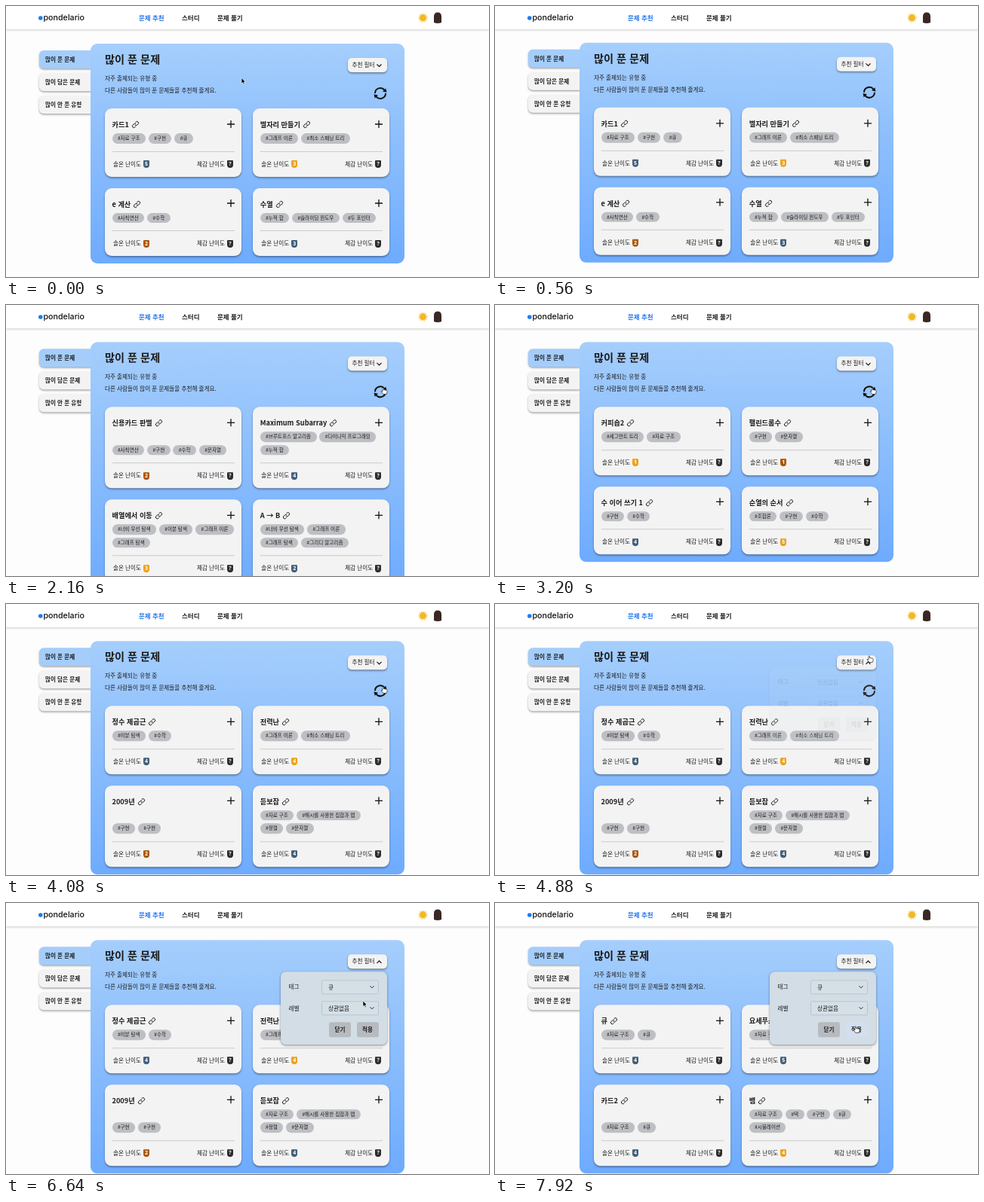
Animation of 640 by 360 pixels, one loop 8 s. Source, as an HTML page:

```html
<!DOCTYPE html>
<html lang="ko">
<head>
<meta charset="utf-8">
<style>
html, body { margin: 0; width: 100%; height: 100%; overflow: hidden; background: #fdfdfd; }
body { position: relative; font: 400 7.6px "Noto Sans CJK KR", "Noto Sans CJK", sans-serif; color: #1c1c1c; }
body *, body { box-sizing: border-box; }
svg { fill: none; stroke: #111; overflow: visible; }
.abs, .t, .tab, .popup div, .popup svg, .card > svg { position: absolute; }
/* top gives the vertical centre of the line */
.t { line-height: 20px; margin-top: -10px; white-space: nowrap; }
header { position: absolute; z-index: 2; width: 640px; height: 31px; background: #fff; box-shadow: 0 1px 3px rgba(0,0,0,.2); font-size: 8.5px; font-weight: 700; }
header svg { stroke: none; }
.brand { font: 500 10.7px/20px Inter, sans-serif; color: #111; }
#page { position: absolute; width: 640px; height: 360px; }
.tab { left: 44px; width: 80px; height: 23.5px; padding-left: 8px; border-radius: 6px 0 0 6px; background: #f3f3f3; box-shadow: 0 1.5px 2.5px rgba(0,0,0,.35); font-weight: 700; line-height: 23px; }
.panel { position: absolute; left: 112px; top: 50px; width: 415.5px; padding: 86.3px 0 10px 19px; border-radius: 9px; background: linear-gradient(#a5cefc, #6eabfe); }
#cards { display: grid; grid-template-columns: 181px 181px; gap: 15.2px; }
.card { position: relative; display: flex; flex-direction: column; padding-top: 33px; border-radius: 9px; background: #f3f3f3; box-shadow: 0 1.5px 2.5px rgba(0,0,0,.4); }
.name { left: 9.5px; top: 20.7px; font-size: 9.2px; font-weight: 700; }
.name svg { margin-left: 4px; vertical-align: -1.5px; }
.tags { flex: 1; display: flex; flex-wrap: wrap; align-content: flex-end; gap: 3.8px; width: 163px; margin-left: 9.5px; }
.tags span { height: 13.5px; padding: 0 7.4px; border-radius: 7px; background: #bdbfc3; font-size: 6.6px; line-height: 13px; white-space: nowrap; }
.foot { position: relative; flex: none; height: 44px; }
.foot hr { position: absolute; left: 9.5px; top: 10px; width: 162px; height: 1px; margin: 0; border: 0; background: #cbcbcb; }
.badge { position: absolute; top: 22.5px; width: 8px; height: 10px; border-radius: 1px 1px 4px 4px; color: #fff; font: 700 7px/9px "Noto Sans", sans-serif; text-align: center; }
.filter { left: 452.5px; top: 68.5px; width: 52.5px; height: 19.5px; border-radius: 5px; background: #f3f3f3; box-shadow: 0 1.5px 2.5px rgba(0,0,0,.4); }
.popup { position: absolute; left: 363.5px; top: 92.3px; width: 141.5px; height: 97px; border-radius: 7px; background: #d2dde5; box-shadow: 0 1px 3px rgba(0,0,0,.45); }
.popup .select { left: 54.5px; width: 76px; height: 19.5px; padding-left: 8px; border: .7px solid #bcc5cd; border-radius: 2px; background: #d5dfe6; line-height: 18px; }
.popup .button { top: 67px; width: 29px; height: 20px; border-radius: 3px; background: #b7bbc0; font-weight: 700; line-height: 19px; text-align: center; }
#list { left: 414.5px; top: 106.7px; width: 75.5px; height: 251px; border-radius: 4px; background: rgba(226,230,230,.96); box-shadow: 0 1px 4px rgba(0,0,0,.45); font-size: 7px; font-weight: 500; }
#items { position: absolute; left: 2px; top: 1px; width: 72px; height: 240px; overflow: hidden; }
#items div { height: 12.26px; padding-left: 9.5px; border-radius: 3px; line-height: 12px; white-space: nowrap; }
#items .on { background: #b117b2; color: #fff; }
.check { left: 4px; top: 4.5px; }
#cursor { left: 0; top: 0; z-index: 3; }
</style>
</head>
<body>
<header>
  <svg class="abs" width="640" height="32">
    <circle cx="45.8" cy="16" r="2.8" fill="#1c7cf0"/>
    <circle cx="552.5" cy="15.7" r="4.6" fill="#f3b824"/>
    <circle cx="552.5" cy="15.7" r="5.6" style="stroke:#f5cf70" stroke-width="1.4" stroke-dasharray="1.4 1.53"/>
    <path d="M567 22V14Q567 8.500 572 8.500T577 14V22Q572 24 567 22Z" fill="#3b2723"/>
  </svg>
  <span class="t brand" style="left:49.500px;top:15.500px">pondelario</span>
  <span class="t" style="left:176px;top:14.500px;color:#2375e9">문제 추천</span>
  <span class="t" style="left:233px;top:14.500px">스터디</span>
  <span class="t" style="left:280px;top:14.500px">문제 풀기</span>
</header>

<div id="page">
  <div class="tab" style="top:59px;background:#a4cdfb">많이 푼 문제</div>
  <div class="tab" style="top:89px">많이 담은 문제</div>
  <div class="tab" style="top:119px">많이 안 푼 유형</div>
  <div class="panel"><div id="cards"></div></div>
  <span class="t" style="left:131px;top:70px;font-size:14.2px;font-weight:700">많이 푼 문제</span>
  <span class="t" style="left:131px;top:95.500px">자주 출제되는 유형 중</span>
  <span class="t" style="left:131px;top:111.500px">다른 사람들이 많이 푼 문제들을 추천해 줄게요.</span>
  <div class="abs filter">
    <span class="t" style="left:6px;top:9.700px">추천 필터</span>
    <svg class="abs" style="left:38px;top:7px" width="7" height="6"><path id="arrow" stroke-width="1.2"/></svg>
  </div>
  <svg class="abs" style="left:495.500px;top:115.500px" width="1" height="1">
    <g id="half"><path d="M-7 0A7 7 0 0 1 5.500 -4.300" stroke-width="2"/><path d="M3 -2.500L8.500 -1.200L7.300 -6.500Z" fill="#111" stroke="none"/></g>
    <use href="#half" transform="rotate(180)"/>
  </svg>
  <div class="popup" id="popup">
    <span class="t" style="left:11px;top:20px">태그</span>
    <span class="t" style="left:11px;top:48.500px">레벨</span>
    <div class="select" id="tagSelect" style="top:10.500px"></div>
    <div class="select" style="top:38.500px">상관없음</div>
    <svg style="left:118px;top:18px" width="6" height="34"><path d="M.5 1L3 3.500L5.500 1M.5 29L3 31.500L5.500 29" stroke-width=".9"/></svg>
    <div class="button" style="left:64.500px">닫기</div>
    <div class="button" id="apply" style="left:101px">적용</div>
  </div>
  <div class="abs" id="list">
    <div id="items"></div>
    <svg class="abs check" width="6" height="6"><path id="check" d="M.5 3L2 5L5 0"/></svg>
    <svg class="abs" style="left:34.500px;top:244px" width="6" height="4"><path d="M.5 .5L3 3L5.500 .5" stroke-width="1"/></svg>
  </div>
</div>

<svg class="abs" id="cursor" width="10" height="12">
  <path id="pointer" d="M0 0V7.500L1.700 6L2.900 8.600L4.200 8L3 5.500H5.300Z" fill="#000" stroke="#fff" stroke-width=".6"/>
  <path id="hand" d="M-1 4V.5Q-.3 -.6 .5 .5V2.500L4.500 3.300Q5.500 3.800 5 6L4.200 8.500H0L-3 5Q-3 3.700 -1 5Z" fill="#fff" stroke="#222" stroke-width=".7"/>
</svg>

<script>
const LOOP = 8000;
const $ = id => document.getElementById(id);
const TIERS = { s: '#435f7a', g: '#eda21a', b: '#ad5608' };

// title | tier and level | tags
const SETS = [
  { from: 0, cards: ['카드1|s5|자료 구조,구현,큐', '별자리 만들기|g3|그래프 이론,최소 스패닝 트리',
    'e 계산|b2|사칙연산,수학', '수열|s3|누적 합,슬라이딩 윈도우,두 포인터'] },
  { from: 1520, cards: ['신용카드 판별|b2|사칙연산,구현,수학,문자열', 'Maximum Subarray|s4|브루트포스 알고리즘,다이나믹 프로그래밍,누적 합',
    '배열에서 이동|g3|너비 우선 탐색,이분 탐색,그래프 이론,그래프 탐색', 'A → B|s2|너비 우선 탐색,그래프 이론,그래프 탐색,그리디 알고리즘'] },
  { from: 2880, cards: ['커피숍2|g1|세그먼트 트리,자료 구조', '팰린드롬수|b1|구현,문자열',
    '수 이어 쓰기 1|s4|구현,수학', '순열의 순서|g5|조합론,구현,수학'] },
  { from: 3760, cards: ['정수 제곱근|s4|이분 탐색,수학', '전력난|g4|그래프 이론,최소 스패닝 트리',
    '2009년|b2|구현,구현', '듣보잡|s4|자료 구조,해시를 사용한 집합과 맵,정렬,문자열'] },
  { from: 7360, cards: ['큐|s4|자료 구조,큐', '요세푸스 문제 0|s5|자료 구조,구현,큐',
    '카드2|s4|자료 구조,큐', '뱀|g4|자료 구조,덱,구현,큐,시뮬레이션'] }
];
const OPTIONS = '상관없음,큐,DP,BFS,DFS,스택,정렬,그리디,자료 구조,이분 탐색,시뮬레이션,브루트포스,분할 정복,문자열,구현,백트래킹,두 포인터,트리,해싱,슬라이딩 윈도우'.split(',');

// time, x, y of the cursor tip
const PATH = [[0, 312, 95.5], [80, 312, 95.5], [480, 420, 104], [880, 500, 110], [4480, 500, 110], [4760, 496, 69],
  [4960, 496, 69], [5300, 473.5, 113], [5900, 473.5, 113], [6240, 472, 123], [6500, 472, 123], [7040, 478, 164], [LOOP, 478, 164]];

const badge = (x, color, label) => `<span class="badge" style="left:${x}px;background:${color}">${label}</span>`;
const cardHtml = text => {
  const [name, level, tags] = text.split('|');
  return `<div class="card">
    <span class="t name">${name}<svg width="9" height="9"><path d="M3.800 5.200A2 2 0 0 0 6.500 5.300L8 3.800A1.900 1.900 0 0 0 5.200 1L4.400 1.800M5.200 3.800A2 2 0 0 0 2.500 3.700L1 5.200A1.900 1.900 0 0 0 3.800 8L4.600 7.200"/></svg></span>
    <svg style="left:162px;top:15.500px" width="10" height="10"><path d="M0 5H10M5 0V10" stroke-width="1.3"/></svg>
    <div class="tags">${tags.split(',').map(tag => `<span>#${tag}</span>`).join('')}</div>
    <div class="foot"><hr><span class="t" style="left:11px;top:27px">솔온 난이도</span>${badge(51, TIERS[level[0]], level[1])}
    <span class="t" style="left:122px;top:27px">체감 난이도</span>${badge(162, '#2d2d2d', '?')}</div></div>`;
};

$('items').innerHTML = OPTIONS.map(option => `<div>${option}</div>`).join('');

const ramp = (t, from, to) => Math.min(1, Math.max(0, (t - from) / (to - from)));
const ease = p => p * p * (3 - 2 * p);
const show = (id, visible) => $(id).style.display = visible ? '' : 'none';

function cursorAt(t) {
  const i = PATH.findIndex(point => point[0] > t);
  const [t0, x0, y0] = PATH[i - 1], [t1, x1, y1] = PATH[i];
  const p = ease(ramp(t, t0, t1));
  return [x0 + (x1 - x0) * p, y0 + (y1 - y0) * p];
}

let shownSet;
function draw(t) {
  const set = SETS.findLast(s => s.from <= t);
  if (set !== shownSet) {
    $('cards').innerHTML = set.cards.map(cardHtml).join('');
    shownSet = set;
  }
  const scroll = -1.2 * ease(ramp(t, 80, 480)) + .5 * ease(ramp(t, 720, 1040));
  $('page').style.transform = `translateY(${scroll}px)`;

  const open = ramp(t, 4850, 5120);
  show('popup', open > 0);
  $('popup').style.opacity = open;
  $('popup').style.transform = `translateY(${-9 * (1 - open)}px)`;
  $('arrow').setAttribute('d', t >= 4800 ? 'M.5 4.500L3.500 1.500L6.500 4.500' : 'M.5 1.500L3.500 4.500L6.500 1.500');

  const listOpen = t >= 5400 && t < 6480, picked = t >= 6480;
  const hovered = t >= 6160 ? 1 : 0;
  show('list', listOpen);
  [...$('items').children].forEach((item, i) => item.className = i === hovered ? 'on' : '');
  $('check').style.stroke = hovered ? '#222' : '#fff';
  $('tagSelect').textContent = picked ? '큐' : '상관없음';
  $('tagSelect').style.boxShadow = listOpen ? '0 0 0 1px #6b9fd8' : '';
  const applyHover = t >= 6960;
  $('apply').style.background = applyHover ? '#d3dfee' : '';

  const [x, y] = cursorAt(t);
  const onLink = (t >= 880 && t < 4560) || (t >= 4720 && t < 5040) || applyHover;
  show('cursor', t < 400 || t >= 880);
  show('hand', onLink);
  show('pointer', !onLink);
  $('cursor').style.transform = `translate(${x}px, ${y}px)`;
}

const start = performance.now();
function frame() {
  draw((performance.now() - start) % LOOP);
  requestAnimationFrame(frame);
}
frame();
</script>
</body>
</html>
```
